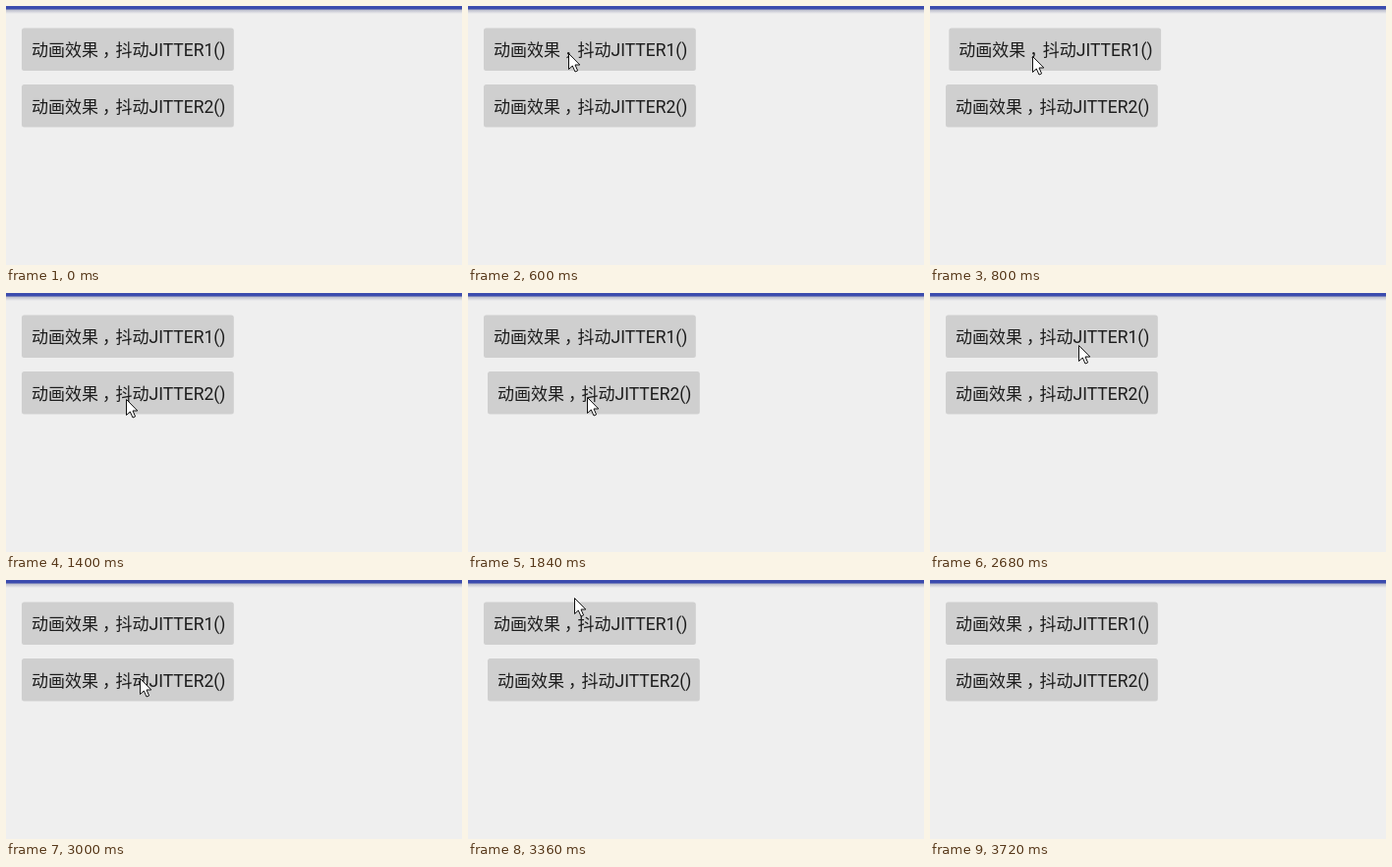
Recreate the animation shown at these times as an HTML page. Size 464 by 264 pixels, loop 4080 ms.

```html
<!DOCTYPE html>
<html lang="zh-CN">
<head>
<meta charset="utf-8">
<title>Jitter</title>
<style>
  html, body { margin: 0; width: 100%; height: 100%; overflow: hidden; background: #efefef; }
  svg { display: block; width: 464px; height: 264px; }
  text { font: 17px Roboto, "Noto Sans CJK SC", "Noto Sans CJK", sans-serif; fill: #1c1c1c; }
  .latin { font-size: 17.5px; }
  .button rect { fill: #cfcfcf; }
</style>
</head>
<body>
<svg viewBox="0 0 464 264">
  <defs>
    <linearGradient id="shadow" x2="0" y2="1">
      <stop stop-color="#b0b2c4"/>
      <stop offset="1" stop-color="#efefef"/>
    </linearGradient>
  </defs>
  <rect y="3" width="464" height="5" fill="url(#shadow)"/>
  <rect width="464" height="3.5" fill="#3b4bae"/>
  <g class="button" id="first">
    <rect x="16" y="22.6" width="215.8" height="43.5" rx="2.5"/>
    <text x="26" y="51">动画效果<tspan dx="4">，</tspan><tspan x="111.5">抖动</tspan><tspan class="latin">JITTER1()</tspan></text>
  </g>
  <g class="button" id="second">
    <rect x="16" y="80" width="215.8" height="43.5" rx="2.5"/>
    <text x="26" y="108.5">动画效果<tspan dx="4">，</tspan><tspan x="111.5">抖动</tspan><tspan class="latin">JITTER2()</tspan></text>
  </g>
  <path id="cursor" d="M.5 .5V16.5L4.3 13L7 19L9.6 17.9L7 12H11.8Z" fill="#fff" stroke="#111"/>
</svg>
<script>
const LOOP = 4080, STEP = 40;
const [first, second, cursor] = ["first", "second", "cursor"].map(id => document.getElementById(id));

// The pointer rests at each stop and glides straight to the next.
const stops = [
  { x: 46, y: 8, arrive: 80, leave: 80 },
  { x: 100, y: 44, arrive: 360, leave: 560 },
  { x: 104, y: 51, arrive: 640, leave: 920 },
  { x: 122, y: 109, arrive: 1120, leave: 1360 },
  { x: 121, y: 106, arrive: 1440, leave: 2000 },
  { x: 151, y: 53, arrive: 2360, leave: 2720 },
  { x: 136, y: 100, arrive: 3000, leave: 3240 },
  { x: 98, y: -9, arrive: 3400, leave: 3400 }
];

const mix = (a, b, k) => a + (b - a) * k;
const move = (node, x, y = 0) => node.setAttribute("transform", `translate(${x} ${y})`);
const during = (t, start, length) => t >= start && t < start + length;
const swing = (t, period) => Math.sin(2 * Math.PI * t / period);
const push = (t, period) => (1 - Math.cos(2 * Math.PI * t / period)) / 2;

function firstOffset(t) {
  if (during(t, 600, 480)) return 3.3 * swing(t - 600, 160);
  if (during(t, 2440, 240)) return -2 * push(t - 2440, 80);
  return 0;
}

function secondOffset(t) {
  const start = [1760, 3280].find(s => during(t, s, 440));
  return start ? 4 * push(t - start, 160) : 0;
}

function placeCursor(t) {
  const next = stops.findIndex(stop => stop.arrive > t);
  const visible = next > 0;
  cursor.style.display = visible ? "" : "none";
  if (!visible) return;
  const from = stops[next - 1], to = stops[next];
  const k = Math.max(0, (t - from.leave) / (to.arrive - from.leave));
  move(cursor, Math.round(mix(from.x, to.x, k)), Math.round(mix(from.y, to.y, k)));
}

const origin = performance.now();
function draw(now) {
  const elapsed = Math.max(0, now - origin) % LOOP;
  const t = Math.floor(elapsed / STEP) * STEP;
  move(first, firstOffset(t));
  move(second, secondOffset(t));
  placeCursor(t);
  requestAnimationFrame(draw);
}
draw(origin);
</script>
</body>
</html>
```
